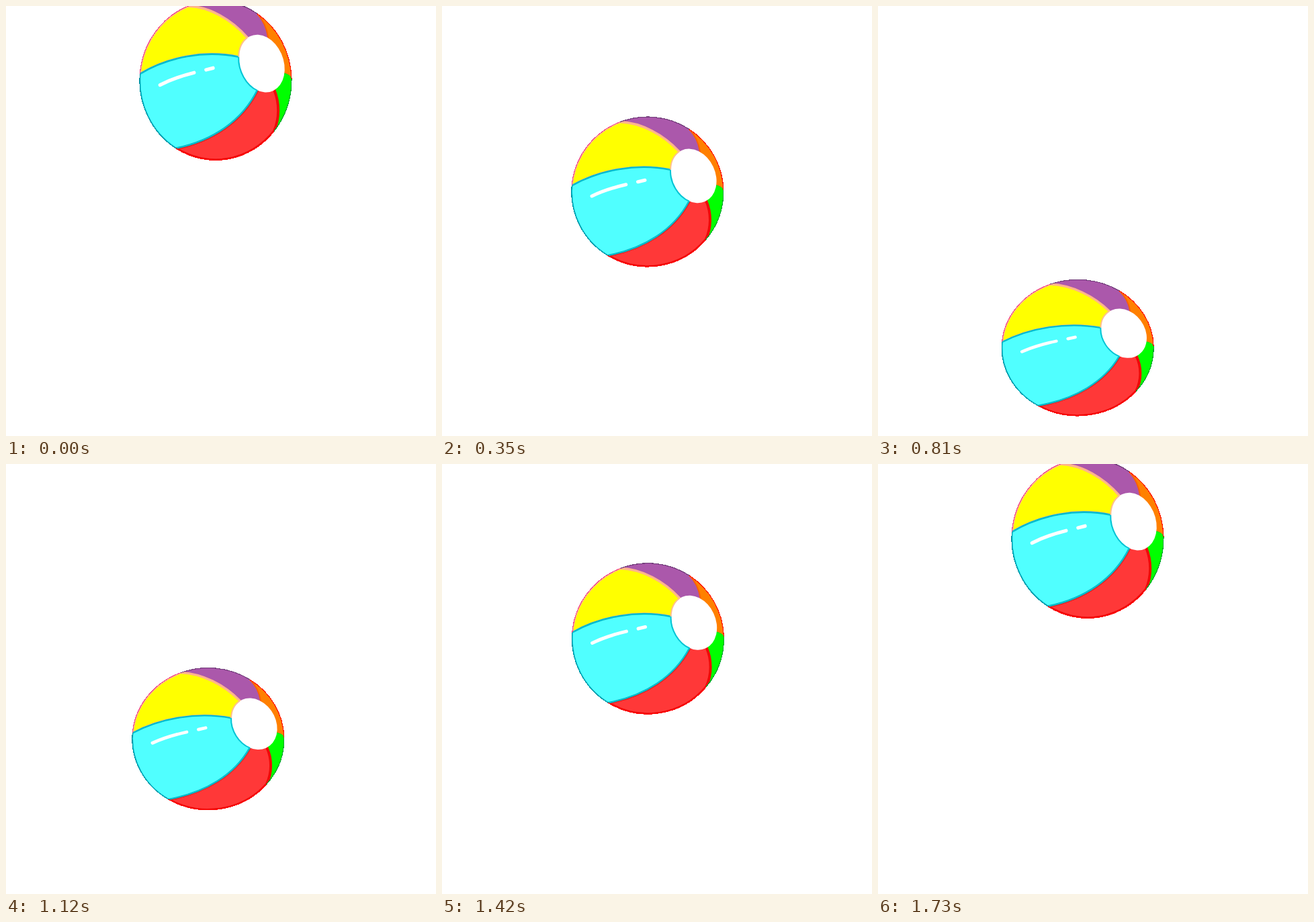
An HTML page for the animation above (1.77 s loop, 640x640 px).

```html
<!DOCTYPE html>
<html lang="en">
<head>
<meta charset="utf-8">
<title>Bouncing beach ball</title>
<style>
  html, body { margin: 0; width: 100%; height: 100%; overflow: hidden; background: #fff; }
  svg { display: block; width: 100%; height: 100%; }
</style>
</head>
<body>
<svg viewBox="0 0 640 640">
  <defs>
    <clipPath id="outline"><ellipse cx="305.8" cy="276.75" rx="113" ry="111.4"/></clipPath>
  </defs>
  <g id="ball">
    <g id="panels" stroke-linejoin="round" clip-path="url(#outline)"></g>
    <g id="rims" fill="none" stroke-width="1.2" shape-rendering="crispEdges"></g>
    <ellipse cx="374.2" cy="253.2" rx="32.5" ry="41.8" transform="rotate(-25 374.2 253.2)" fill="#fff"/>
    <g fill="none" stroke-width="2">
      <path d="M353 217A32.5 41.8 -25 0 0 340 244" stroke="#ffc08c"/>
      <path d="M340 244A32.5 41.8 -25 0 0 368 291" stroke="#00c4d4"/>
    </g>
    <path d="M223 283.2Q244 273 273.8 266M291.5 262L302 259.5" fill="none" stroke="#fff" stroke-width="5" stroke-linecap="round"/>
  </g>
</svg>
<script>
const CX = 305.8, CY = 276.75, RX = 113, RY = 111.4;
const HUB = '374 253';
const LOOP = 1770;

// Seams run from the rim (angle in degrees) to the white hub.
const seams = {
  lemonSky:    { rim: 184.7, c1: '235 244', c2: '290 234', end: '340 244' },
  lemonPlum:   { rim: 248.9, c1: '297 174', c2: '330 192', end: '353 217' },
  plumOrange:  { rim: 303.3, c1: '376 192', c2: '382 204', end: '384 217' },
  orangeGreen: { rim: 358.6, c1: '416 270', c2: '412 268', end: '407 267' },
  greenRed:    { rim: 39.8,  c1: '401 330', c2: '401 308', end: '393 290' },
  redSky:      { rim: 121.7, c1: '302 361', c2: '345 333', end: '367.5 291' }
};

// Painted in order: later panels cover the shared seam.
const panels = [
  { from: 'lemonPlum',   to: 'plumOrange',  fill: '#ab58ab', edge: '#a050a4', width: 1.5, rim: '#74407c' },
  { from: 'plumOrange',  to: 'orangeGreen', fill: '#ff8000', edge: '#ff6000', width: 2,   rim: '#ff1800' },
  { from: 'orangeGreen', to: 'greenRed',    fill: '#00ff00', edge: '#00ee10', width: 1.5, rim: '#00a828' },
  { from: 'greenRed',    to: 'redSky',      fill: '#ff3838', edge: '#f00808', width: 4,   rim: '#ff0000' },
  { from: 'lemonSky',    to: 'lemonPlum',   fill: '#ffff00', edge: '#ffb48c', width: 3.4, rim: '#f0508c' },
  { from: 'redSky',      to: 'lemonSky',    fill: '#50ffff', edge: '#00bccc', width: 2.5, rim: '#0098a8' }
];

function rimPoint(deg) {
  const a = deg * Math.PI / 180;
  return `${CX + RX * Math.cos(a)} ${CY + RY * Math.sin(a)}`;
}

function rimPath(from, to) {
  return `M${rimPoint(from.rim)}A${RX} ${RY} 0 0 1 ${rimPoint(to.rim)}`;
}

function panelPath(from, to) {
  return rimPath(from, to) + `C${to.c1} ${to.c2} ${to.end}L${HUB}L${from.end}` +
    `C${from.c2} ${from.c1} ${rimPoint(from.rim)}Z`;
}

document.getElementById('panels').innerHTML = panels.map(p =>
  `<path d="${panelPath(seams[p.from], seams[p.to])}" fill="${p.fill}" stroke="${p.edge}" stroke-width="${p.width}"/>`
).join('');
document.getElementById('rims').innerHTML = panels.map(p =>
  `<path d="${rimPath(seams[p.from], seams[p.to])}" stroke="${p.rim}"/>`
).join('');

const ball = document.getElementById('ball');

// Linear fall and rise over 52 steps, shown at 26 pictures per second.
function draw(time) {
  const tick = Math.floor((time % LOOP) / 10);
  const picture = Math.ceil((tick + 0.5) * 0.26) - 1;
  const step = Math.round(picture * 1.152 + 0.1);
  const depth = 26 - Math.abs(step - 26);
  const x = 312 - 0.617 * depth;
  const y = 110.7 + 16.58 * depth;
  const squash = (238 - 1.45 * depth) / 223.4;
  ball.setAttribute('transform', `translate(${x} ${y}) scale(1 ${squash}) translate(${-CX} ${-CY})`);
}

const start = performance.now();
function loop() {
  draw(performance.now() - start);
  requestAnimationFrame(loop);
}
loop();
</script>
</body>
</html>
```
